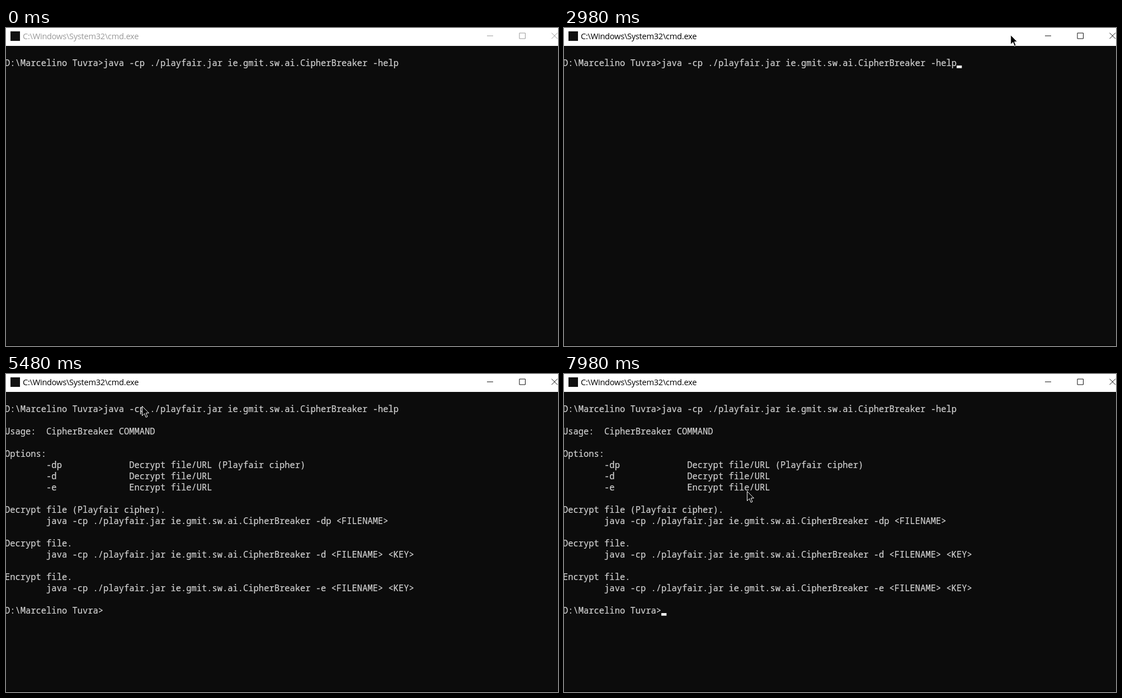
An HTML page for the animation above (8000 ms loop, 987 px wide and 568 px high).

```html
<!DOCTYPE html>
<html lang="en">
<head>
<meta charset="utf-8">
<title>Terminal</title>
<style>
  html, body { margin: 0; width: 100%; height: 100%; overflow: hidden; background: #0c0c0c; }
  svg { display: block; width: 987px; height: 568px; }
  text { white-space: pre; }
  .title { font: 14.6px "Open Sans", "Noto Sans", sans-serif; letter-spacing: -.25px; }
  .line {
    font: 15.44px "Noto Sans Mono", "DejaVu Sans Mono", monospace;
    fill: #d2d2d2; stroke: #d2d2d2; stroke-width: .2px;
  }
</style>
</head>
<body>
<svg viewBox="0 0 987 568">
  <rect width="987" height="568" fill="#0c0c0c"/>
  <rect y="566" width="987" height="2" fill="#040404"/>
  <rect width="987" height="32" fill="#fff"/>
  <rect x="8" y="6" width="17" height="17" fill="#111"/>
  <text id="title" class="title" x="30" y="20">C:\Windows\System32\cmd.exe</text>
  <g id="buttons" fill="none" stroke-width="1">
    <path d="M860 14H871M918 9H928.5V19H918Z"/>
    <path d="M975.5 8.7L986 19.2M986 8.7L975.5 19.2"/>
  </g>
  <g id="command"></g>
  <g id="output"></g>
  <rect id="caret" width="9.3" height="4.7" fill="#f2f2f2"/>
  <path id="mouse" d="M.5 .5V17.5L4.6 13.6 7.2 20.3 9.9 19.2 7.3 12.7H12.4Z"
        fill="#000" stroke="#fff" stroke-linejoin="round"/>
</svg>
<script>
const LOOP = 8000, CELL = 9.264, ROW = 20, LEFT = -2, TOP = 68;
const ACTIVE = 2480, ENTER = 3480;
const prompt = 'D:\\Marcelino Tuvra>';
const run = 'java -cp ./playfair.jar ie.gmit.sw.ai.CipherBreaker ';
const tab = ' '.repeat(8);
const option = (flag, info) => tab + flag.padEnd(16) + info;

const output = [
  '', '',
  'Usage:  CipherBreaker COMMAND',
  '',
  'Options:',
  option('-dp', 'Decrypt file/URL (Playfair cipher)'),
  option('-d', 'Decrypt file/URL'),
  option('-e', 'Encrypt file/URL'),
  '',
  'Decrypt file (Playfair cipher).',
  tab + run + '-dp <FILENAME>',
  '',
  'Decrypt file.',
  tab + run + '-d <FILENAME> <KEY>',
  '',
  'Encrypt file.',
  tab + run + '-e <FILENAME> <KEY>',
  '',
  prompt
];

// Pointer stops: time, x, y; without a place it is hidden.
const stops = [
  [0], [1480, 824, 539], [1980], [2480, 798.2, 12], [4480, 745, 110],
  [4980, 373, 84], [5480, 243, 57], [5980, 43, 128], [6480, 98, 162],
  [6980, 92, 190], [7480, 280, 203], [7980, 327, 209]
];

const $ = id => document.getElementById(id);
const show = (node, on) => node.setAttribute('visibility', on ? 'visible' : 'hidden');

function addLine(group, string, row) {
  const node = document.createElementNS('http://www.w3.org/2000/svg', 'text');
  node.setAttribute('class', 'line');
  const indent = string.length - string.trimStart().length;
  node.setAttribute('x', LEFT + indent * CELL);
  node.setAttribute('y', TOP + row * ROW);
  node.textContent = string.trimStart();
  group.append(node);
}

const command = prompt + run + '-help';
addLine($('command'), command, 0);
output.forEach((string, row) => string && addLine($('output'), string, row));

function caretOn(t) {
  if (t < 2980) return false;
  return t < 4480 || Math.floor((t - 4480) / 500) % 2 === 1;
}

function draw(t) {
  const active = t >= ACTIVE, done = t >= ENTER;
  $('title').setAttribute('fill', active ? '#000' : '#999');
  $('buttons').setAttribute('stroke', active ? '#111' : '#999');
  show($('output'), done);

  const column = (done ? prompt : command).length;
  const row = done ? output.length - 1 : 0;
  $('caret').setAttribute('x', LEFT + column * CELL);
  $('caret').setAttribute('y', TOP - 1 + row * ROW);
  show($('caret'), caretOn(t));

  const [, x, y] = stops.findLast(stop => stop[0] <= t);
  show($('mouse'), x !== undefined);
  if (x !== undefined) $('mouse').setAttribute('transform', `translate(${x} ${y})`);
}

let start;
function tick(now) {
  start ??= now;
  draw(Math.max(0, now - start) % LOOP);
  requestAnimationFrame(tick);
}
draw(0);
requestAnimationFrame(tick);
</script>
</body>
</html>
```
